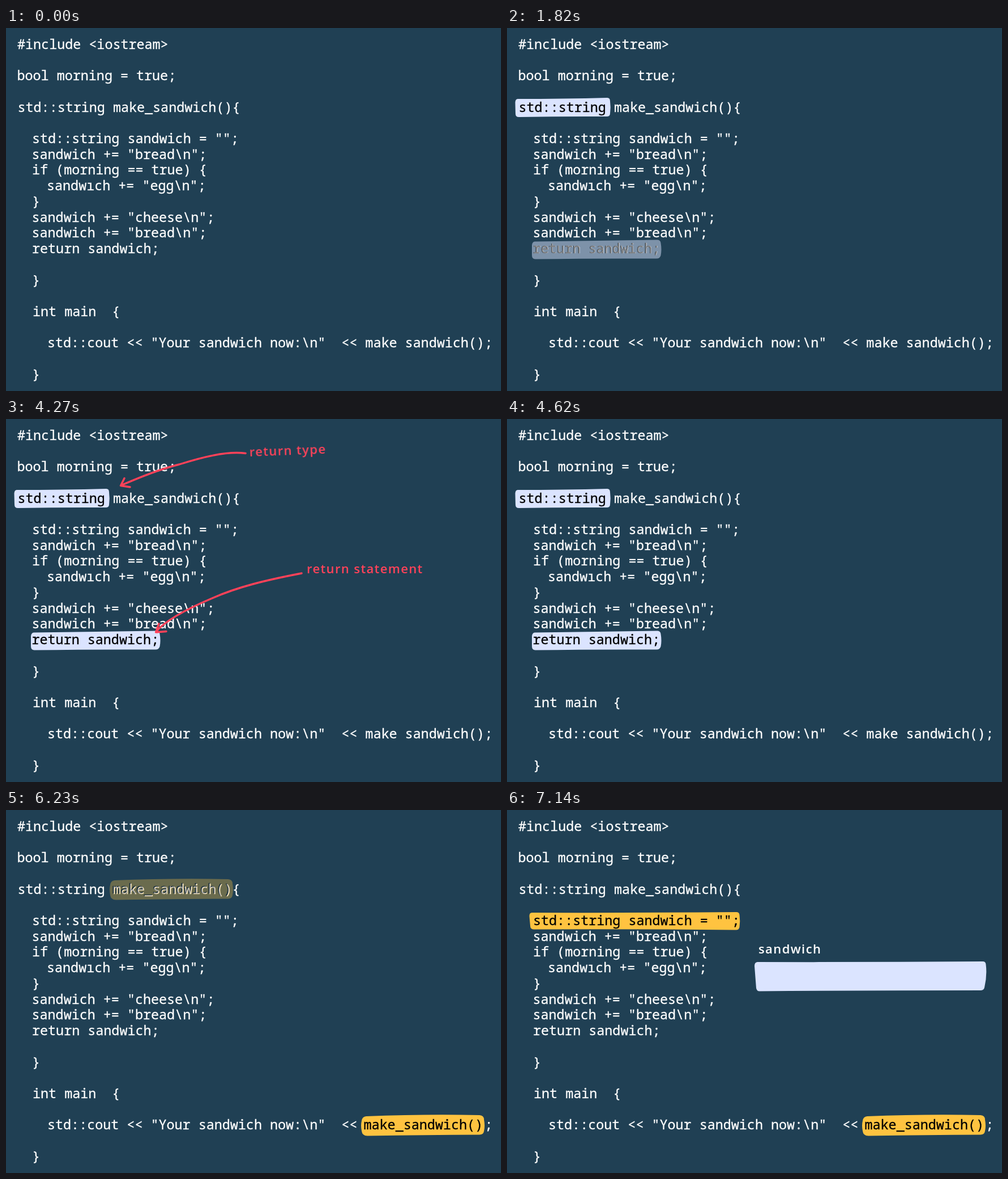
Animation of 874x640 px, one loop 8 s. Source, as an HTML page:

```html
<!DOCTYPE html>
<html lang="en">
<head>
<meta charset="utf-8">
<title>Sandwich function</title>
<style>
  html, body { margin: 0; width: 100%; height: 100%; overflow: hidden; background: #204054; }
  svg { display: block; width: 874px; height: 640px; }

  .code {
    font: 23.4px "Noto Sans Mono", "DejaVu Sans Mono", monospace;
    font-variant-ligatures: none;
    color: #fff;
    fill: currentColor;
    stroke: currentColor;
    stroke-width: .3px;
  }
  .dark { color: #000; }
  .hand { font: 600 22px "Open Sans", "Noto Sans", sans-serif; letter-spacing: 1.4px; }
  .lilac { fill: #dbe4ff; }
  .amber { fill: #ffc340; }
  .red { fill: #ff4259; }
  .arrow { fill: none; stroke: #ff4259; stroke-width: 3.4; stroke-linecap: round; stroke-linejoin: round; }

  .anim { opacity: 0; animation: 8s linear infinite; }
  #type { animation-name: type; }
  #ret { animation-name: ret; }
  #call { animation-name: call; }
  #def { animation-name: def; }
  #body { animation-name: body; }
  #notes { animation: notes 8s step-end infinite; }

  @keyframes type {
    0% { opacity: 0; }
    11.375% { opacity: 0; animation-timing-function: steps(2, jump-start); }
    13.125% { opacity: 1; }
    64.75% { opacity: 1; animation-timing-function: steps(2, jump-start); }
    66.5%, 100% { opacity: 0; }
  }
  @keyframes ret {
    0% { opacity: 0; }
    22.75% { opacity: 0; animation-timing-function: steps(2, jump-start); }
    24.5% { opacity: 1; }
    64.75% { opacity: 1; animation-timing-function: steps(2, jump-start); }
    66.5%, 100% { opacity: 0; }
  }
  @keyframes call {
    0% { opacity: 0; }
    70.875% { opacity: 0; animation-timing-function: steps(3, jump-start); }
    73.5%, 100% { opacity: 1; }
  }
  @keyframes def {
    0% { opacity: 0; }
    77.875% { opacity: 0; animation-timing-function: steps(3, jump-start); }
    80.5% { opacity: 1; }
    87.5% { opacity: 1; animation-timing-function: steps(3, jump-start); }
    90.125%, 100% { opacity: 0; }
  }
  @keyframes body {
    0% { opacity: 0; }
    87.5% { opacity: 0; animation-timing-function: steps(3, jump-start); }
    90.125%, 100% { opacity: 1; }
  }
  /* slides in from the right edge with ease-out, leaves with ease-in */
  @keyframes notes {
    0% { transform: translateX(700px); }
    28.875% { transform: translateX(480px); }
    29.75% { transform: translateX(307px); }
    30.625% { transform: translateX(173px); }
    31.5% { transform: translateX(77px); }
    32.375% { transform: translateX(19px); }
    33.25% { transform: translateX(0); }
    53.375% { transform: translateX(19px); }
    54.25% { transform: translateX(77px); }
    55.125% { transform: translateX(173px); }
    56% { transform: translateX(307px); }
    56.875% { transform: translateX(480px); }
    57.75%, 100% { transform: translateX(700px); }
  }
</style>
</head>
<body>
<svg viewBox="0 0 874 640">
  <defs>
    <g id="chip">
      <path class="amber" d="M636 540 Q740 536 836 538 Q844 538.5 844 546 Q846 557 844 566 Q843 572.5 836 572.5 Q740 573 638 574.5 Q629 574.5 628 566 Q626 556 628 548 Q629 540.5 636 540 Z"/>
      <text class="code dark" x="631.5" y="563">make_sandwich()</text>
    </g>
  </defs>

  <g class="code">
    <text x="20" y="36.5">#include &lt;iostream&gt;</text>
    <text x="19.5" y="92">bool morning = true;</text>
    <text x="20.5" y="147.5">std::string make_sandwich(){</text>
    <text x="46" y="202.5">std::string sandwich = "";</text>
    <text x="45.5" y="230.5">sandwich += "bread\n";</text>
    <text x="46" y="258">if (morning == true) {</text>
    <text x="72" y="286">sandwıch += "egg\n";</text>
    <text x="46" y="313.5">}</text>
    <text x="45.5" y="341.5">sandwich += "cheese\n";</text>
    <text x="45.5" y="369">sandwich += "bread\n";</text>
    <text x="46" y="397">return sandwich;</text>
    <text x="46" y="452.5">}</text>
    <text x="47" y="508">int main&#160;&#160;{</text>
    <text x="73" y="563">std::cout &lt;&lt; "Your sandwich now:\n"&#160;&#160;&lt;&lt; make sandwich();</text>
    <text x="46" y="619">}</text>
  </g>

  <g id="type" class="anim">
    <path class="lilac" d="M19 125 Q100 125 177 123 Q182 123 182 129 Q183.5 140 182 151 Q182 156 176 156 Q100 155.5 21 157 Q15 157 15 151 L14.5 131 Q15 125 19 125 Z"/>
    <text class="code dark" x="20.5" y="147.5">std::string</text>
  </g>

  <g id="ret" class="anim">
    <path class="lilac" d="M49 376.5 Q160 375 266 373.5 Q271 374 271.5 379 Q273.5 391 271.5 401 Q270 406.5 264 406.5 Q150 406 50 407.5 Q44 407 44 401 L44 383 Q44.5 377 49 376.5 Z"/>
    <text class="code dark" x="45.5" y="397">return sandwich;</text>
  </g>

  <g id="notes">
    <path class="arrow" d="M404 60.5 C370 56 325 68 287 80 C250 89 215 104 184 117 M190 104.5 L183.5 117.5 L200 120"/>
    <path class="arrow" d="M503 272 C440 284 390 296 345 316 C305 333 264 353 246 375 M251 361 L245.5 376 L264 374.5"/>
    <text class="hand red" x="411" y="66" transform="rotate(-2.2 411 66)">return type</text>
    <text class="hand red" x="512" y="271.5">return statement</text>
  </g>

  <g id="call" class="anim"><use href="#chip"/></g>
  <g id="def" class="anim"><use href="#chip" x="-444" y="-416"/></g>

  <g id="body" class="anim">
    <path class="amber" d="M44 181 Q220 181.5 405 180 Q410 180 410.5 185 Q412 196 410.5 206 Q410 211.5 404 211.5 Q220 209.5 47 210.5 Q41 210 41 204 L39.5 187 Q39.5 181 44 181 Z"/>
    <text class="code dark" x="46" y="202.5">std::string sandwich = "";</text>
    <text class="hand" fill="#fff" x="444" y="253">sandwich</text>
    <path class="lilac" d="M442 268 Q640 268.5 840 267 Q845 267 845.5 272 Q848 292 843 313 Q842 317.5 837 318 Q640 318 446 319.5 Q441 319.5 440 314 L437 275 Q437 268.5 442 268 Z"/>
  </g>
</svg>
</body>
</html>
```
